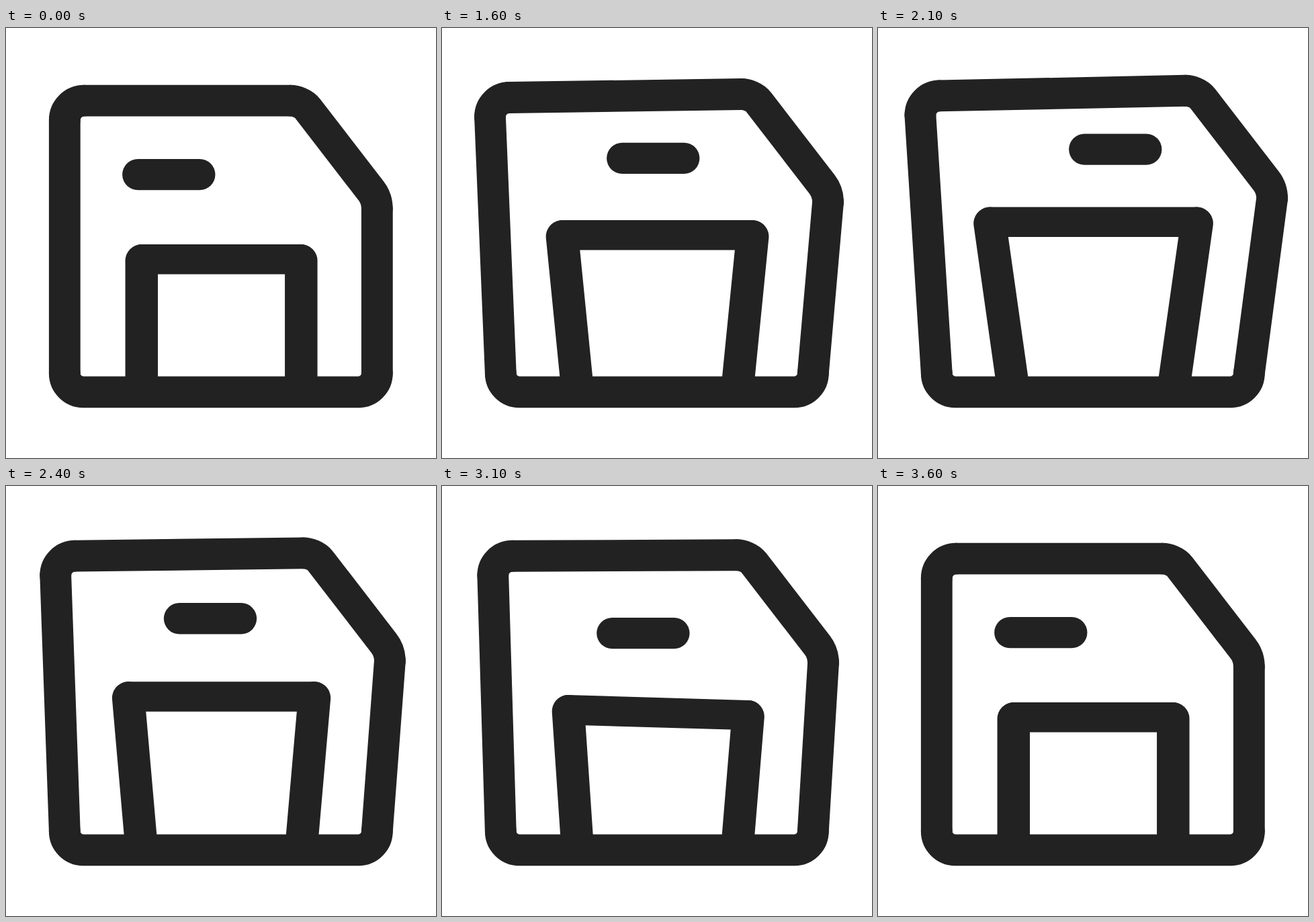
An HTML page without scripts that plays this animation: 640x640 px, repeating every 6000 ms.

```html
<!DOCTYPE html>
<html lang="en">
<head>
<meta charset="utf-8">
<title>Hopping disk</title>
<style>
@property --high { syntax: "<number>"; inherits: true; initial-value: 0; }
@property --low { syntax: "<number>"; inherits: true; initial-value: 0; }

html, body { margin: 0; width: 100%; height: 100%; overflow: hidden; background: #fff; }

/* How far each moving corner shifts in the high and the low hop. */
svg {
  display: block; width: 100%; height: 100%;
  --tlx: calc(-29 * var(--high) - 14.5 * var(--low));
  --tly: calc(-8.6 * var(--high) - 5 * var(--low));
  --trx: calc(40.8 * var(--high) + 19.2 * var(--low));
  --try: calc(-17.8 * var(--high) - 6.9 * var(--low));
  --slx: calc(-42 * var(--high) - 17.5 * var(--low));
  --sly: calc(-66 * var(--high) - 14 * var(--low));
  --srx: calc(42 * var(--high) + 20.5 * var(--low));
  --sry: calc(-66 * var(--high) - 4 * var(--low));
  animation: high 6s steps(8) infinite, low 6s steps(4) infinite;
}

/* Even rise and fall, one stair per 100 ms. */
@keyframes high {
  0% { --high: 0; animation-timing-function: step-end; }
  20% { --high: .05; }
  33.3332% { --high: 1.04; }
  33.3333% { --high: .965; }
  46.6665% { --high: -.03; }
  46.6666%, 100% { --high: 0; }
}
@keyframes low {
  0% { --low: 0; animation-timing-function: step-end; }
  46.6666% { --low: .05; }
  53.3332% { --low: 1.04; }
  53.3333% { --low: .96; }
  59.9999% { --low: -.03; }
  60%, 100% { --low: 0; }
}

path, line { fill: none; stroke: #222; stroke-width: 46.8px; stroke-linecap: round; }

/* A unit line laid from (x1, y1) to (x2, y2). */
line {
  --dx: calc(var(--x2) - var(--x1));
  --dy: calc(var(--y2) - var(--y1));
  transform: matrix(var(--dx), var(--dy), calc(-1 * var(--dy)), var(--dx), var(--x1), var(--y1));
  vector-effect: non-scaling-stroke;
}

.left { --x1: 87.3; --y1: 514; --x2: calc(87.3 + var(--tlx)); --y2: calc(137 + var(--tly)); }
.top { --x1: calc(116 + var(--tlx)); --y1: calc(108.2 + var(--tly)); --x2: calc(423.5 + var(--trx)); --y2: calc(108.2 + var(--try)); }
.right { --x1: calc(552.3 + var(--trx)); --y1: calc(268.7 + var(--try)); --x2: 552.3; --y2: 514; }
.corner { transform: translate(calc(var(--tlx) * 1px), calc(var(--tly) * 1px)); }
.bevel { transform: translate(calc(var(--trx) * 1px), calc(var(--try) * 1px)); }

.leg { stroke-width: 48.5px; --y1: 540; }
.west { --x1: 201.8; --x2: calc(201.8 + var(--slx)); --y2: calc(346.3 + var(--sly)); }
.east { --x1: 439.3; --x2: calc(439.3 + var(--srx)); --y2: calc(346.3 + var(--sry)); }
.lintel {
  stroke-width: 44.5px;
  --x1: calc(201.8 + var(--slx)); --y1: calc(344.3 + var(--sly));
  --x2: calc(439.3 + var(--srx)); --y2: calc(344.3 + var(--sry));
}

.label {
  stroke-width: 46.3px;
  transform: translate(calc(132px * var(--high) + 72px * var(--low)), calc(-44.8px * var(--high) + 1.2px * var(--low)));
}
</style>
</head>
<body>
<svg viewBox="0 0 640 640">
  <path d="M552.3 514a27.8 27.8 0 0 1-27.8 27.8H115.1a27.8 27.8 0 0 1-27.8-27.8"/>
  <path class="corner" d="M87.3 137a28.8 28.8 0 0 1 28.7-28.8"/>
  <path class="bevel" d="M423.5 108.2c8 0 19.5 4 25.5 11.8l94.5 122.5c5.5 7.1 8.8 16.5 8.8 26.2"/>
  <line class="left" x2="1"/>
  <line class="top" x2="1"/>
  <line class="right" x2="1"/>
  <line class="leg west" x2="1"/>
  <line class="leg east" x2="1"/>
  <line class="lintel" x2="1"/>
  <path class="label" d="M196.3 218.2h92"/>
</svg>
</body>
</html>
```
